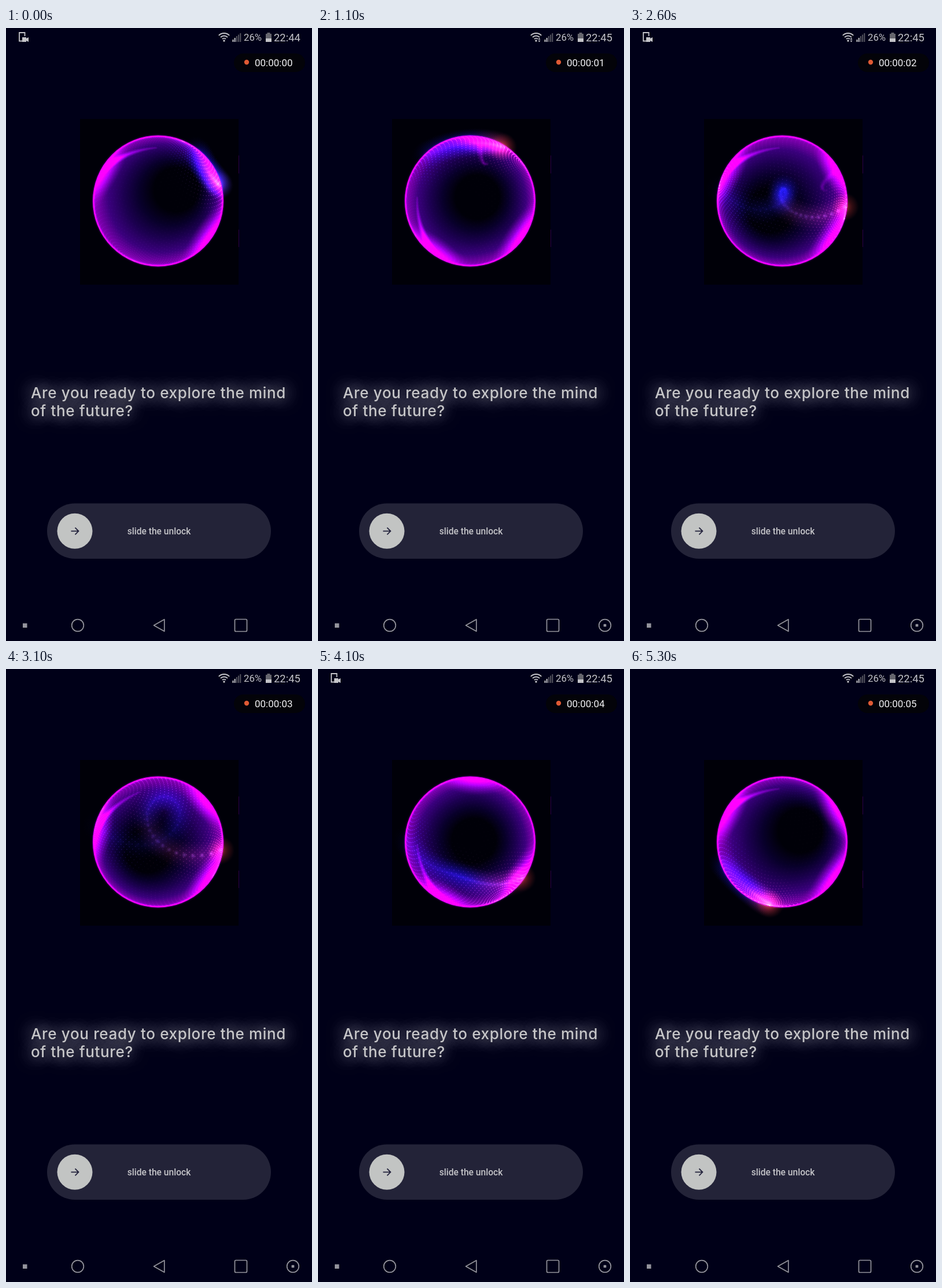
Write an HTML page with a canvas that moves like this. It is 529x1058 px and loops after 5.4 s.

```html
<!DOCTYPE html>
<html lang="en">
<head>
<meta charset="utf-8">
<style>
html, body { margin: 0; width: 529px; height: 1058px; overflow: hidden; background: #000018; }
canvas, svg, p { position: absolute; margin: 0; }
canvas { left: 128px; top: 157px; }
svg { left: 0; top: 0; font-family: Roboto, sans-serif; }
p {
  left: 43px; top: 613.5px; white-space: nowrap; color: #c6c6c8;
  font: 500 26px/31px Inter, sans-serif; letter-spacing: .65px;
  text-shadow: 0 0 30px #fff9, 0 0 30px #fff9;
}
</style>
</head>
<body>
<canvas id="orb" width="274" height="286"></canvas>
<p>Are you ready to explore the mind<br>of the future?</p>
<svg width="529" height="1058" fill="none">
  <g id="rec">
    <path d="M28 22.500H23V8h9.500v6" stroke="#c4c4c8" stroke-width="1.800"/>
    <path d="M28 16h7v2l4-2v8l-4-2v2h-7z" fill="#c4c4c8"/>
  </g>
  <path d="M367.800 12.800a13 13 0 0 1 18.400 0M371 16a8.500 8.500 0 0 1 12 0M374 19a4.300 4.300 0 0 1 6 0" stroke="#c4c4c8" stroke-width="1.800"/>
  <circle cx="377" cy="22" r="1.700" fill="#c4c4c8"/>
  <path id="traffic" d="M380.500 20l2-3 2 3zM380.500 21.500l2 3 2-3z" fill="#c4c4c8"/>
  <path d="M391.500 24v-4h2v4zM394.700 24v-7h2v7z" fill="#c4c4c8"/>
  <path d="M397.900 24v-10h2v10zM401.100 24v-12.500h2v12.500zM404.300 24v-15h2v15z" fill="#55555f"/>
  <path d="M449 18v-8h2.500v-2h5v2h2.500v8z" fill="#66666e"/>
  <path d="M449 18h10v6h-10z" fill="#c4c4c8"/>
  <text x="411" y="22" font-size="16.800" fill="#c4c4c8">26%</text>
  <text id="clock" x="463" y="22.500" font-size="18.400" fill="#c4c4c8"></text>

  <rect x="394" y="44" width="123" height="32" rx="16" fill="#030309"/>
  <circle cx="416" cy="59" r="4.200" fill="#df5a34"/>
  <text id="timer" x="430" y="66" font-size="17" fill="#f2f2f4"></text>
  <path d="M402.500 220v31M402.500 348v30" stroke="#2c0046"/>

  <rect x="71" y="820.500" width="387" height="95.500" rx="47.700" fill="#232338"/>
  <circle cx="119" cy="868.300" r="30.500" fill="#c2c4c3"/>
  <path d="M112.500 868.300h12.500m-5.500-6l6 6-6 6" stroke="#20203a" stroke-width="1.700"/>
  <text x="264.500" y="873.700" font-size="15.600" font-weight="500" text-anchor="middle" fill="#c4c4c8">slide the unlock</text>

  <path d="M29 1027.500h7.500v7.500h-7.500z" fill="#94949c"/>
  <g stroke="#94949c" stroke-width="1.700" stroke-linejoin="round">
    <circle cx="124" cy="1031" r="10.300"/>
    <path d="M255.500 1031l18.300-10.300v20.600z"/>
    <rect x="395.500" y="1020.500" width="21" height="21" rx="2"/>
    <g id="dock"><circle cx="496" cy="1031" r="10.300"/><path d="M494.500 1029.500h3v3h-3z" fill="#94949c"/></g>
  </g>
</svg>
<script>
const LOOP = 5.4, CX = 263, CY = 298.5, R = 112, TAU = Math.PI * 2;
const $ = id => document.getElementById(id);
const c = $('orb').getContext('2d');
// Angles of the two ends of the bright ridge, every 0.9 s
const HOT = [-.25, -1.1, -.75, .2, .05, 1.05, 1.85];
const TAIL = [-.93, -3.8, 2.7, 3.4, 3.4, 3, 2.8];

const mix = (a, b, k) => a + (b - a) * k;
const clamp = v => Math.max(0, Math.min(1, v));
const bump = (t, mid, width) => Math.exp(-(((t - mid) / width) ** 2));
const polar = (a, rho) => [CX + R * rho * Math.cos(a), CY + R * rho * Math.sin(a)];

function keyed(keys, t) {
  const i = Math.floor(t / .9);
  return mix(keys[i], keys[i + 1], t / .9 - i);
}

function glow([x, y], r, rgb, alpha) {
  const g = c.createRadialGradient(x, y, 0, x, y, r);
  g.addColorStop(0, `rgba(${rgb},${alpha})`);
  g.addColorStop(.5, `rgba(${rgb},${alpha * .4})`);
  g.addColorStop(1, `rgba(${rgb},0)`);
  c.fillStyle = g;
  c.fillRect(x - r, y - r, 2 * r, 2 * r);
}

function disc() {
  c.beginPath();
  c.arc(CX, CY, R, 0, TAU);
}

// Purple shell around a dark hollow that circles slowly
function shade(t) {
  const swing = Math.cos(TAU * t / LOOP);
  const g = c.createRadialGradient(268 + 26 * swing, 297 - 18 * swing, 38, CX, CY, R);
  ['#000008', '#08002a', '#1c0050', '#3a007c', '#8c00b8'].forEach((color, i) => g.addColorStop(i / 4, color));
  c.fillStyle = g;
  c.fill();
}

function lobe(angle, spread) {
  for (let d = -spread; d <= spread; d += .06) {
    const fall = Math.cos(d / spread * 1.57) ** 2;
    glow(polar(angle + d, .98), 12 + 18 * fall, '235,0,255', .2 * fall);
  }
}

// Curved crease, thick at the start and thin at the end
function fold(start, bend, end, alpha) {
  for (let k = 0; k <= 1; k += .025) {
    const at = i => mix(mix(start[i], bend[i], k), mix(bend[i], end[i], k), k);
    glow([at(0), at(1)], mix(9, 2.5, k), '230,0,255', alpha * mix(.3, .16, k));
  }
}

// The ridge hugs the rim, except midway when it sags across the middle
function ridgeAt(t) {
  const hot = keyed(HOT, t), tail = keyed(TAIL, t), sag = .08 + 1.6 * bump(t, 3.1, .8);
  return Array.from({ length: 41 }, (_, i) => {
    const k = i / 40;
    return polar(mix(hot, tail, k), .97 - sag * Math.sin(Math.PI * k));
  });
}

function drawRidge(ridge, warm) {
  ridge.forEach((p, i) => {
    const k = i / 40, cool = clamp(k * 2.5);
    glow(p, 26, `${mix(mix(90, 230, warm), 25, cool)},${mix(50, 20, cool)},${mix(mix(255, 90, warm), 220, cool)}`, .13 * (1 - .6 * k));
    glow(p, 5, `${mix(255, 70, cool)},${mix(150, 50, cool)},255`, .06 + .26 * (1 - k) ** 3);
  });
}

// Points on a wavy turning sphere, lit near the ridge
function dots(t, ridge, warm) {
  const turn = t / 1.8 + .4;
  for (let a = -1.5; a < 1.5; a += .065) {
    for (let b = -1.5; b < 1.5; b += .065) {
      const lat = a + .12 * Math.sin(3 * b + 2 * t);
      const u = Math.cos(lat) * Math.sin(b), v = Math.sin(lat);
      const rim = u * u + v * v;
      const [x, y] = polar(Math.atan2(v, u) + turn, Math.sqrt(rim));
      let near = 1e9, k = 0;
      for (let i = 0; i <= 40; i += 4) {
        const d = Math.hypot(x - ridge[i][0], y - ridge[i][1]);
        if (d < near) { near = d; k = i / 40; }
      }
      const lit = clamp(1 - near / 55) * (.3 + .5 * rim) + .1 * rim;
      c.fillStyle = `rgba(${mix(255, 80, k)},${mix(100, 50, k)},${mix(mix(255, 150, warm), 255, k)},${lit * .8})`;
      c.fillRect(x - .6, y - .6, 1.3, 1.3);
    }
  }
}

function drawOrb(t) {
  const sway = Math.cos(TAU * t / 2.7), warm = clamp(t);
  const left = 2.85 + .8 * sway, top = -1 + .5 * sway, deep = bump(t, 1.8, .6);
  const ridge = ridgeAt(t);
  c.setTransform(1, 0, 0, 1, 0, 0);
  c.globalCompositeOperation = 'source-over';
  c.fillStyle = '#000008';
  c.fillRect(0, 0, 274, 286);
  c.translate(-128, -157);

  c.save();
  disc();
  c.clip();
  shade(t);
  c.globalCompositeOperation = 'lighter';
  lobe(.6, .7);
  lobe(left, .7);
  lobe(top, .6);
  fold(polar(left, .98), polar(left + .5, .93), polar(left + 1.05, .82), 1);
  fold(polar(top, .98), polar(top + .15, .5), polar(top + .3, mix(.85, .08, deep)), deep);
  dots(t, ridge, warm);
  c.restore();

  c.globalCompositeOperation = 'lighter';
  c.strokeStyle = '#b000c0';
  c.lineWidth = 1.8;
  c.shadowColor = '#a000d0';
  c.shadowBlur = 3;
  disc();
  c.stroke();
  c.shadowBlur = 0;
  drawRidge(ridge, warm);
  glow(ridge[0], 24, `${mix(90, 255, warm)},${mix(50, 70, warm)},${mix(255, 40, warm)}`, .4);
}

function show(id, on) {
  $(id).setAttribute('visibility', on ? 'visible' : 'hidden');
}

function frame(now) {
  const t = Math.floor(now / 100) % 54 / 10;
  drawOrb(t);
  $('timer').textContent = '00:00:0' + Math.floor(t + .3);
  $('clock').textContent = t < .3 ? '22:44' : '22:45';
  show('dock', t >= .3);
  show('traffic', t >= .3 && t < 3);
  show('rec', Math.floor((t + .57) / 1.07) % 2 === 0);
  requestAnimationFrame(frame);
}
requestAnimationFrame(frame);
</script>
</body>
</html>
```
